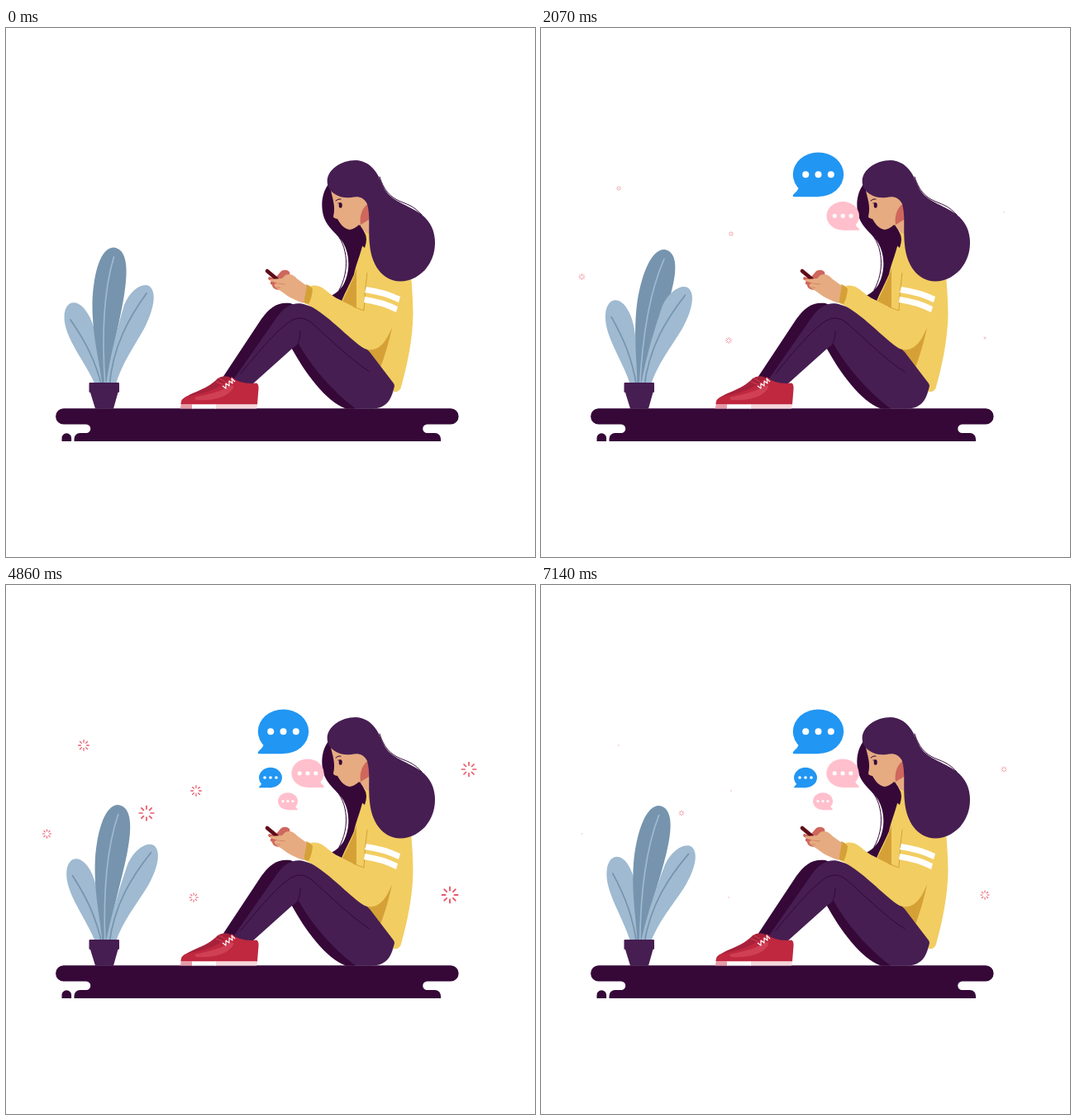
These frames come from a looping animation (640x640 px, 7210 ms). An HTML page:

```html
<!DOCTYPE html>
<html lang="en">
<head>
<meta charset="utf-8">
<title>Chatting</title>
<style>
html, body { margin: 0; width: 100%; height: 100%; overflow: hidden; background: #fff; }
svg { display: block; width: 100%; height: 100%; }
.deep { fill: #350838; }
.plum { fill: #461e52; }
.skin { fill: #e6ab81; }
.blush { fill: #cf675d; }
.yellow { fill: #f2cd62; }
.gold { fill: #d5a137; }
.white { fill: #fff; }
.line { fill: none; stroke: #350838; stroke-width: 1; stroke-linecap: round; }
.pale { fill: #9fbad1; }
.slate { fill: #7694ae; }
.vein { fill: none; stroke-width: 1.7; stroke-linecap: round; }
</style>
</head>
<body>
<svg viewBox="0 0 640 640">
  <defs>
    <g id="spark" stroke="#e9586a" stroke-width="2" stroke-linecap="round"></g>
    <g id="bubble">
      <ellipse rx="30.7" ry="26.8"/>
      <path d="M-23 15Q-25 20-30 24Q-32 27-29 27H0V10z"/>
      <g class="white"><circle cx="-15.3" r="4"/><circle r="4"/><circle cx="15.3" r="4"/></g>
    </g>
  </defs>

  <g id="plant">
    <g id="leafLeft">
      <path class="pale" d="M109 434C96 403 70 375 70.500 349C71 331 84 327 95 340C106 353 109 372 112 392L119 434z"/>
      <path class="vein" stroke="#7694ae" d="M78 353C96 379 108 402 116 434"/>
    </g>
    <g id="leafMid">
      <path class="slate" d="M117 434C113 402 104 372 104.500 332C106 294 115 266 130 265.500C147 267 148 292 143 323C137 360 127 392 123 434z"/>
      <path class="vein" stroke="#9fbad1" stroke-width="2" d="M130.500 277C122 305 114 350 120 434"/>
    </g>
    <g id="leafRight">
      <path class="pale" d="M121 434C125 400 135 362 143 335C151 316 165 308 173 312C183 319 179 340 168 362C155 386 140 405 132 434z"/>
      <path class="vein" stroke="#7694ae" d="M170 321C149 350 129 385 125 434"/>
    </g>
    <path class="plum" d="M101.500 429H136Q137 429 137 430V440Q137 441 135.500 441L130 460.500H108L102 441Q100.500 441 100.500 440V430Q100.500 429 101.500 429z"/>
  </g>

  <g class="deep">
    <path d="M69.700 460.300H538a9.600 9.600 0 0 1 0 19.200H509.500a5.250 5.250 0 0 0 0 10.500H519a7 7 0 0 1 7 7V500H82.500V497a7 7 0 0 1 7-7H97a5.250 5.250 0 0 0 0-10.500H69.700a9.600 9.600 0 0 1 0-19.200z"/>
    <path d="M67.500 500V496a5.800 5.800 0 0 1 11.600 0V500z"/>
  </g>

  <g id="girl">
    <path class="deep" d="M391 188C382 198 380 216 385 230C390 243 402 250 408 260C417 276 416 296 408 311Q402 320 393 324L408 331C425 315 434 285 437 262L430 236 400 200z"/>
    <path class="line" d="M398 247C414 263 416 294 403 317"/>

    <path class="yellow" d="M433 247C434 264 424 282 421 298C414 314 409 322 405 333L430 388 452 412 468 431 469 440Q475 441 477.500 436C485 410 492 378 492.500 346Q492 320 490 300L452 247z"/>
    <path class="gold" d="M424 290C421 304 412 319 406 333L424 342z"/>
    <path class="gold" d="M468 358C464 378 458 398 452 413C445 403 436 395 424 384C446 396 457 383 468 358z"/>

    <path class="skin" d="M392 192C395 207 399 215 396 228Q396 230 401 231C405 238 409 243 416 244Q422 243 427 238L434 247 442 250V205L418 200z"/>
    <path class="blush" d="M429 238C427 226 432 216 439 212V232z"/>
    <path class="deep" d="M434 248Q438 254 434 266L429 262 428 238z"/>
    <ellipse class="deep" cx="404.700" cy="214.500" rx="2" ry="3.300"/>
    <path class="line" stroke-width="1.500" d="M399 209Q402 206 405 207"/>
    <path class="line" d="M402 212L405 212"/>

    <path class="deep" d="M262 423L309 352C319 338 329 331 344 333L362 340 290 431z"/>
    <path class="plum" d="M276 424L327 351C337 336 350 330 363 335C380 340 394 349 406 360L440 392 469 430Q470 432 470 433C466 452 459 460 443 460.500H414C392 452 365 418 346 388L298 431Q288 432 276 424z"/>
    <path class="deep" d="M346 388L354 382C370 411 396 440 423 460.500H411C387 452 361 416 346 388z"/>
    <path class="line" d="M284 418C306 391 328 365 345 354Q357 347 369 356C392 376 415 400 440 416M356 367Q356 377 352 384"/>

    <path class="yellow" d="M369 312C382 309 388 320 400 327L432 343 436 294 482 302C479 333 473 352 464 369C456 386 446 392 434 388C415 377 388 344 361 333z"/>
    <path class="gold" d="M363 310Q369 312 371 316Q370 327 366 334L360 332z"/>
    <path fill="none" stroke="#d5a137" d="M437 296Q434 318 433 342L420 337"/>
    <path class="white" d="M436 313Q458 316 477 325L475 332Q456 323 434 320zM434 325Q456 328 474 337L472 344Q454 335 433 332z"/>

    <path class="plum" d="M389 189C386 174 403 160 423 160C442 161 450 176 456 191C463 207 478 211 492 219C510 228 519 241 519 260C519 287 499 306 477 306.500C455 306 442 286 440 262C438 245 441 226 437 213C433 204 425 203 418 205C405 207 391 200 389 189z"/>
    <path class="line" stroke-width=".8" d="M452 180C458 199 467 206 480 211S496 219 503 226"/>

    <path class="blush" d="M327 301L333 294Q339 291 343 295L344 302 335 306zM318 301Q315 304 321 306Q318 309 322 311Q322 316 330 317L338 306z"/>
    <path d="M316 294L328 304" stroke="#5f0b18" stroke-width="4.600" stroke-linecap="round"/>
    <path class="skin" d="M320 304L334 303 338 299C345 296 349 300 353 304L364 312 360 333C350 329 342 326 335 320L326 314Q322 309 329 309L320 306z"/>
    <path fill="none" stroke="#cf8260" stroke-width=".8" d="M329 309L338 310M326 314L332 314"/>

    <path fill="#a8213a" d="M212 451C220 441 242 439 256 424Q262 420 270 422L280 434 240 450z"/>
    <path fill="#bf283f" d="M211.500 455.500Q211 449 219 446C240 442 259 437 273 422Q282 430 297 430L303 429.500Q306 431 305.500 437L304 455.500z"/>
    <path fill="#d04054" d="M228 447C246 443 260 440 270 433Q278 431 274 437C266 448 248 451 230 450z"/>
    <path fill="none" stroke="#fff" stroke-width="1.200" stroke-linejoin="round" d="M262 433L266 436 266 430 270 433 270 427 274 430 273 424 277 428"/>
    <path fill="none" stroke="#d04054" d="M254 428L262 431M258 424L265 428"/>
    <path fill="#e59ca7" d="M212 455.500H226V460.500H210.500z"/>
    <path fill="#f5d8dc" d="M253 455.500H304.500L303 460.500H253z"/>
    <path class="white" d="M225 455.500H254V460.500H225z"/>
  </g>

  <g id="sparks"></g>
  <g id="bubbles"></g>
</svg>
<script>
const LOOP = 7210, STEP = LOOP / 101, PERIOD = 1800;
const PHONE = { x: 318, y: 298 };
const $ = id => document.getElementById(id);

function add(parent, tag, attrs) {
  const el = document.createElementNS('http://www.w3.org/2000/svg', tag);
  for (const key in attrs) el.setAttribute(key, attrs[key]);
  return parent.appendChild(el);
}

for (let a = 0; a < 360; a += 45)
  add($('spark'), 'path', { d: 'M0-5.800V-10', transform: `rotate(${a})` });

const sparks = [
  { x: 94, y: 194, start: 70, period: 1782 },
  { x: 230, y: 249, start: 60, period: 1785 },
  { x: 170, y: 276, start: 300, period: 1775 },
  { x: 49.5, y: 301, start: 0, period: 1770 },
  { x: 227, y: 378, start: 0, period: 1770 },
  { x: 537, y: 375, start: 400, period: PERIOD },
  { x: 560, y: 223, start: 220, period: PERIOD }
].map(s => ({ ...s, el: add($('sparks'), 'use', { href: '#spark' }) }));

const bubbles = [
  { x: 335.5, y: 177.2, size: 1, color: '#2196f3', side: 1 },
  { x: 365, y: 227.7, size: .64, color: '#ffbfcc', side: -1 },
  { x: 320, y: 233, size: .455, color: '#2196f3', side: 1 },
  { x: 341, y: 261.6, size: .39, color: '#ffbfcc', side: -1 }
].map((b, i) => {
  const el = add($('bubbles'), 'g', {});
  add(el, 'use', {
    href: '#bubble', fill: b.color,
    transform: `translate(${b.x} ${b.y}) scale(${b.size * b.side} ${b.size})`
  });
  return { el, start: 450 + i * 940 };
});

const leaves = [
  { el: $('leafLeft'), start: 700, rise: 2500, fall: 2370, angle: 9.1 },
  { el: $('leafRight'), start: 1100, rise: 2600, fall: 1990, angle: 7.7 },
  { el: $('leafMid'), start: 0, rise: 2500, fall: 1500, angle: 7.5 }
];

const ease = p => (1 - Math.cos(Math.PI * p)) / 2;

function sway(t, { start, rise, fall, angle }) {
  if (t < start) return 0;
  const u = (t - start) % (rise + fall);
  return angle * (u < rise ? ease(u / rise) : ease(1 - (u - rise) / fall));
}

function twinkle(t, { start, period }) {
  if (t < start) return 0;
  const p = (t - start) % period / period;
  return 1 - Math.abs(2 * p - 1);
}

function pop(u) {
  const peak = 1.068, up = 400, settle = 340;
  if (u <= 0) return 0;
  if (u < up) return peak * (1 - (1 - u / up) ** 3);
  return peak - (peak - 1) * ease(Math.min(1, (u - up) / settle));
}

function draw(t) {
  for (const leaf of leaves)
    leaf.el.setAttribute('transform', `rotate(${sway(t, leaf)} 119 430)`);
  for (const s of sparks)
    s.el.setAttribute('transform', `translate(${s.x} ${s.y}) scale(${twinkle(t, s)})`);
  for (const b of bubbles)
    b.el.setAttribute('transform',
      `translate(${PHONE.x} ${PHONE.y}) scale(${pop(t - b.start)}) translate(${-PHONE.x} ${-PHONE.y})`);
}

const begin = performance.now();
function tick() {
  const t = (performance.now() - begin) % LOOP;
  draw(Math.floor(t / STEP + .03) * STEP % LOOP);
  requestAnimationFrame(tick);
}
tick();
</script>
</body>
</html>
```
